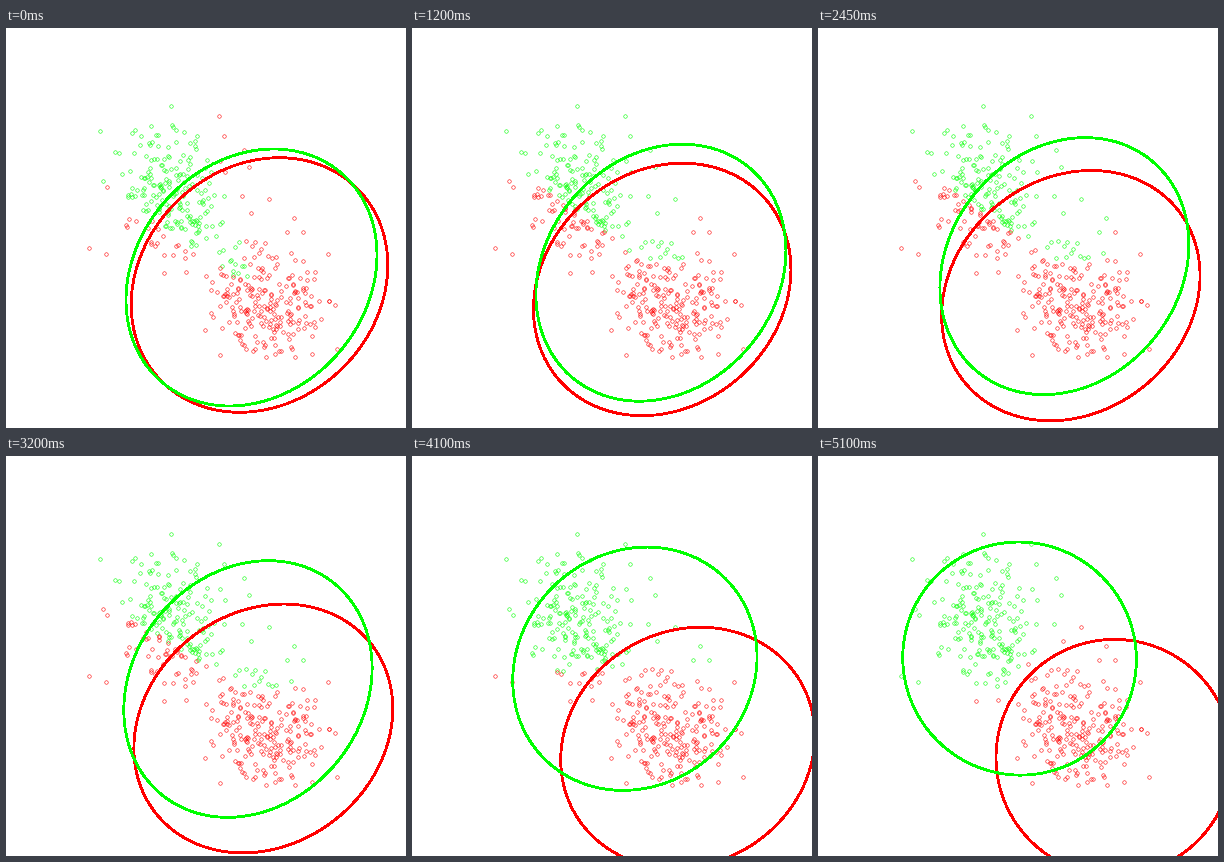
These frames come from a looping animation (400 px wide and 400 px high, 5.15 s). A matplotlib script:

```python
import numpy as np
import matplotlib.pyplot as plt
from matplotlib.animation import FuncAnimation

SIZE, DPI = 400, 100
FRAMES, STEP = 103, 50
PX = 72 / DPI
RED, GREEN = (1, 0, 0), (0, 1, 0)
DRIFT = 3200  # ms of slow drift before the ellipses part

# centre x, centre y, half width, half height, tilt: at start, after drift, at end
GREEN_POSES = np.array([
    [245, 249, 125.5, 128.5, -.175],
    [241.8, 233, 124.2, 128.5, -.165],
    [200.8, 202, 116.7, 116.5, .01],
])
RED_POSES = np.array([
    [253, 256.5, 128.3, 127.3, -.155],
    [256.5, 271.5, 129.5, 124.5, -.16],
    [296, 301, 118, 118, 0],
])
SWING = np.array([5, 1.3, 0, 0, 0])
SETTLE = np.array([4130, 4010, 4330, 4045, 4200])  # ms, midpoint per column

STRAYS = [
    (165, 78), (94, 103), (126, 105), (213, 88), (218, 108), (238, 122),
    (243, 139), (97, 153), (83, 220), (100, 226), (158, 245), (180, 244),
    (263, 171), (236, 168), (245, 185), (288, 190), (281, 204), (297, 204),
    (322, 226), (329, 277), (331, 321), (306, 326), (214, 327), (199, 302),
]


def logistic(t, mid, width):
    return 1 / (1 + np.exp((mid - t) / width))


def cloud(rng, n, mean, std, corr, reach=1.95):
    """Rounded Gaussian samples, cut off at `reach` standard deviations."""
    z = rng.normal(size=(4 * n, 2))
    z = z[np.hypot(*z.T) < reach][:n]
    y = corr * z[:, 0] + np.sqrt(1 - corr**2) * z[:, 1]
    return np.round(np.column_stack([z[:, 0], y]) * std + mean)


def outline(poses, swing, t):
    """Ellipse that drifts and swings slowly, then slides to its end pose."""
    start, drifted, end = poses
    early = start + (drifted - start) * t / DRIFT
    early = early + swing * np.sin(np.pi * min(t / DRIFT, 1))
    s = logistic(t, SETTLE, 195)
    cx, cy, hw, hh, tilt = early * (1 - s) + end * s
    x = np.cos(ANGLE)
    y = tilt * x + np.sqrt(1 - tilt**2) * np.sin(ANGLE)
    return cx + .5 + hw * x, cy + .5 + hh * y


def is_green(t):
    """Points above a turning line and left of a border that moves away."""
    x, y = points.T
    pivot = 213 + 20 * np.exp(-t / 300)
    slope = np.tan(np.radians(36 - 93 * logistic(t, 4200, 300)))
    line = np.minimum(pivot + slope * (x - 205), pivot + 17)
    right = 300 - 75 * np.exp(-t / 900) + .25 * np.exp(-t / 500) * (y - 180)
    return (y < line) & (x < right)


ANGLE = np.linspace(0, 2 * np.pi, 241)

rng = np.random.default_rng(12)
points = np.vstack([
    cloud(rng, 200, (164, 164), (33, 35), .15),
    cloud(rng, 225, (260, 271), (33, 31), .2),
    STRAYS,
])

fig = plt.figure(figsize=(SIZE / DPI, SIZE / DPI), dpi=DPI, facecolor="white")
ax = fig.add_axes([0, 0, 1, 1])
ax.set(xlim=(0, SIZE), ylim=(SIZE, 0))
ax.axis("off")

dots = ax.scatter(points[:, 0] + .5, points[:, 1] + .5, s=(3.5 * PX)**2,
                  facecolors="none", edgecolors=[RED], linewidths=.55 * PX)
red_line, = ax.plot([], [], color=RED, lw=1.8 * PX, antialiased=False)
green_line, = ax.plot([], [], color=GREEN, lw=1.8 * PX, antialiased=False)


def draw(i):
    t = i * STEP
    green_line.set_data(*outline(GREEN_POSES, SWING, t))
    red_line.set_data(*outline(RED_POSES, -SWING, t))
    dots.set_edgecolors([GREEN if g else RED for g in is_green(t)])
    return dots, red_line, green_line


anim = FuncAnimation(fig, draw, frames=FRAMES, interval=STEP,
                     repeat=True, repeat_delay=0, blit=False)
plt.show()
```
